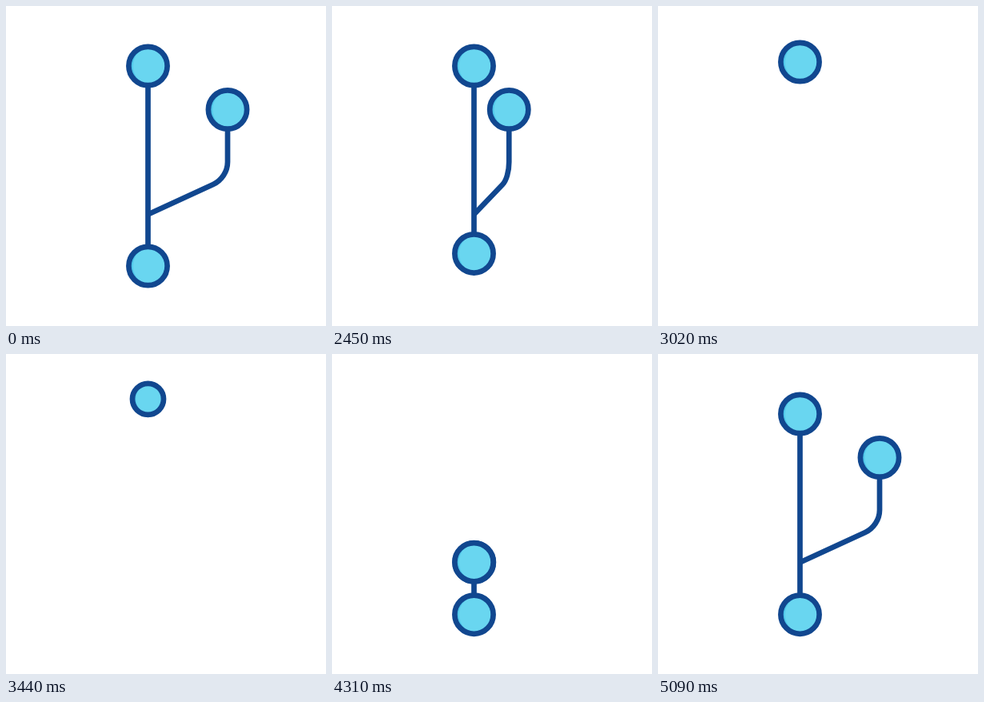
Animation, 400 px wide and 400 px high, one loop 5.12 s. Source, as an HTML page with a canvas:

```html
<!DOCTYPE html>
<html lang="en">
<head>
<meta charset="utf-8">
<title>Branch</title>
<style>
html, body { margin: 0; width: 100%; height: 100%; overflow: hidden; background: #fff; }
canvas { display: block; width: 400px; height: 400px; }
</style>
</head>
<body>
<canvas id="stage"></canvas>
<script>
const LOOP = 5120;
const INK = '#11478f', FILL = '#69d6f0', SHADE = '#50c8ea';
const X = 177.5, TOP = 75, PEAK = 56.3, BOTTOM = 325, FORK = 260.5;
const SIDE_X = 277, SIDE_Y = 129.5;
const RADIUS = 24.1, WEIGHT = 6.7;

const canvas = document.getElementById('stage');
const ctx = canvas.getContext('2d');
const dpr = window.devicePixelRatio || 1;
canvas.width = canvas.height = 400 * dpr;

// Fork line; k squeezes it towards the trunk.
function branchPath(k) {
  const x = dx => X + dx * k;
  return `M${X} ${FORK} L${x(81.5)} 223 C${x(92)} 218 ${x(99.5)} 207 ${x(99.5)} 195 V${SIDE_Y}`;
}
const guide = document.createElementNS('http://www.w3.org/2000/svg', 'path');
guide.setAttribute('d', branchPath(1));
const branchLength = guide.getTotalLength();

const mix = (a, b, p) => a + (b - a) * p;

function ease(t, start, end) {
  const u = Math.min(1, Math.max(0, (t - start) / (end - start)));
  return u * u * (3 - 2 * u);
}

// Smooth monotone curve through [time, value] keys, at rest at both ends.
function curve(keys) {
  const n = keys.length - 1;
  const rate = i => (keys[i + 1][1] - keys[i][1]) / (keys[i + 1][0] - keys[i][0]);
  const slope = keys.map((_, i) => {
    if (i === 0 || i === n) return 0;
    const a = rate(i - 1), b = rate(i);
    return 2 * a * b / (a + b);
  });
  return t => {
    if (t <= keys[0][0]) return keys[0][1];
    if (t >= keys[n][0]) return keys[n][1];
    let i = 0;
    while (t > keys[i + 1][0]) i++;
    const h = keys[i + 1][0] - keys[i][0];
    const u = (t - keys[i][0]) / h, v = 1 - u;
    return v * v * (1 + 2 * u) * keys[i][1] + u * u * (3 - 2 * u) * keys[i + 1][1]
      + h * u * v * (v * slope[i] - u * slope[i + 1]);
  };
}
const rise = curve([[3950, 0], [4160, .1], [4310, .26], [4610, .8665], [4700, .926], [5095, 1]]);
const spread = curve([[4300, 0], [4610, .67], [4740, .87], [5095, 1]]);

function node(x, y, r = RADIUS) {
  if (r < 0.05) return;
  const disc = (cx, radius, color) => {
    ctx.beginPath();
    ctx.arc(cx, y, radius, 0, Math.PI * 2);
    ctx.fillStyle = color;
    ctx.fill();
  };
  disc(x, r, SHADE);
  ctx.save();
  ctx.clip();
  disc(x + r * 0.22, r, FILL);
  ctx.restore();
  ctx.beginPath();
  ctx.arc(x, y, r, 0, Math.PI * 2);
  ctx.stroke();
}

function trunk(y0, y1) {
  ctx.beginPath();
  ctx.moveTo(X, y0);
  ctx.lineTo(X, y1);
  ctx.stroke();
}

function collapse(t) {
  const lift = mix(TOP, PEAK, ease(t, 2930, 3198));
  const low = Math.min(mix(BOTTOM, TOP, ease(t, 2365, 2931)), t > 2931 ? lift : BOTTOM);
  const k = 1 - ease(t, 2000, 2835);
  const r = RADIUS * (1 - ease(t, 3335, 3715));
  if (t < 2931) {
    trunk(TOP, low);
    ctx.save();
    ctx.beginPath();
    ctx.rect(0, 0, 400, low);
    ctx.clip();
    ctx.stroke(new Path2D(branchPath(k)));
    ctx.restore();
    node(mix(X, SIDE_X, k), Math.min(SIDE_Y, low));
    node(X, lift);
  }
  node(X, low, r);
}

function grow(t) {
  const base = BOTTOM + 0.7;
  const high = mix(base, TOP, rise(t));
  const q = spread(t);
  if (t > 3950) {
    trunk(high, base);
    if (t > 4300) {
      const p = guide.getPointAtLength(branchLength * q);
      ctx.save();
      ctx.setLineDash([branchLength * q, branchLength * 2]);
      ctx.stroke(new Path2D(branchPath(1)));
      ctx.restore();
      node(p.x, p.y);
    }
    node(X, high);
  }
  node(X, base, RADIUS * ease(t, 3700, 3990));
}

function draw(now) {
  const t = now % LOOP;
  ctx.setTransform(dpr, 0, 0, dpr, 0, 0);
  ctx.fillStyle = '#fff';
  ctx.fillRect(0, 0, 400, 400);
  ctx.strokeStyle = INK;
  ctx.lineWidth = WEIGHT;
  if (t < 3715) collapse(t);
  else grow(t);
}

const began = performance.now();
function tick() {
  draw(performance.now() - began);
  requestAnimationFrame(tick);
}
tick();
</script>
</body>
</html>
```
